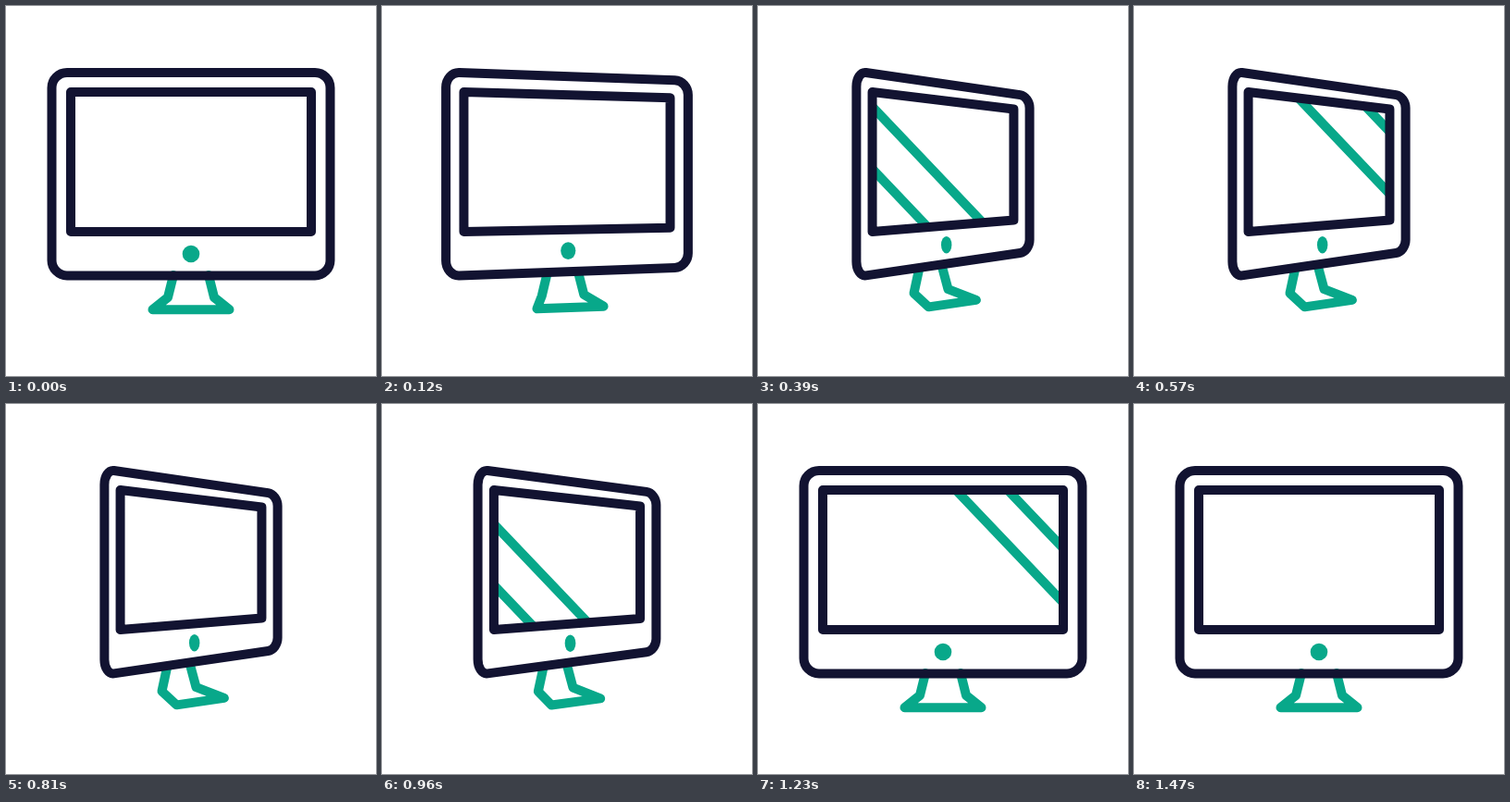
These frames come from a looping animation (400 by 400 pixels, 3620 ms). An HTML page:

```html
<!DOCTYPE html>
<html lang="en">
<head>
<meta charset="utf-8">
<title>Turning monitor</title>
<style>
  html, body { margin: 0; width: 100%; height: 100%; overflow: hidden; background: #fff; }
  svg { display: block; width: 100vw; height: 100vh; }
  path { fill: none; stroke-width: 10; stroke-linecap: round; stroke-linejoin: round; }
  .navy { stroke: #121331; }
  .green { stroke: #08a88a; }
</style>
</head>
<body>
<svg viewBox="0 0 400 400">
  <clipPath id="glass"><path id="hole"/></clipPath>
  <path id="stand" class="green"/>
  <path id="frame" class="navy"/>
  <g id="shine" clip-path="url(#glass)"><path id="rays" class="green"/></g>
  <path id="screen" class="navy"/>
  <ellipse id="dot" cy="268" fill="#08a88a"/>
</svg>
<script>
const LOOP = 3620, STEP = 30, LAST = 49;
const TURN = 9.64;   // steps taken by one turn
const BACK = 40;     // step at which the monitor faces front again
const SWEEP = 20;    // steps between the two shines
const CX = 200, SLOPE = 1.05;

// squeeze: width left when turned; shrink: height lost at the far side
const frame = { half: 150.5, top: 72, bottom: 291.4, round: 16.5, squeeze: 0.622, shrink: 0.221, mid: 181 };
const screen = { half: 130, top: 93, bottom: 244, round: 0, squeeze: 0.588, shrink: 0.205, mid: 183 };

// Half of the stand, top to bottom; drift is the sideways move when turned
const stand = [
  { half: 19, y: 291, squeeze: 0.67, drift: -13.5 },
  { half: 25, y: 315, squeeze: 0.74, drift: -13 },
  { half: 41.5, y: 328.2, squeeze: 0.62, drift: 10.2 }
];

const $ = id => document.getElementById(id);
const set = (id, attrs) => {
  for (const name in attrs) $(id).setAttribute(name, attrs[name]);
};
const mix = (a, b, p) => a + (b - a) * p;

function ease(x) {
  if (x <= 0) return 0;
  if (x >= 1) return 1;
  const a = x ** 1.87, b = (1 - x) ** 1.87;
  return a / (a + b);
}

// Turns away, then back along the same curve in reverse.
const turn = n => ease(Math.min(n, BACK - n) / TURN);

// Rounded rectangle seen in perspective.
function panel(s, p) {
  const span = s.half - s.round;
  const at = (x, y) => {
    const u = (x + span) / (2 * span);
    const scale = 1 - p * s.shrink * u;
    return [CX + x * mix(1, s.squeeze, p), s.mid + (y - s.mid) * scale].join(' ');
  };
  let d = '';
  for (const [sx, sy] of [[-1, -1], [1, -1], [1, 1], [-1, 1]]) {
    const x = sx * s.half, y = sy < 0 ? s.top : s.bottom;
    const side = r => at(x, y - sy * r);
    const flat = r => at(x - sx * r, y);
    const [from, to] = sx === sy ? [side, flat] : [flat, side];
    const r = s.round, c = r * 0.448;
    d += `${d ? 'L' : 'M'}${from(r)}C${from(c)} ${to(c)} ${to(r)}`;
  }
  return d + 'Z';
}

function standPath(p) {
  const at = (k, side) => {
    const x = CX + side * k.half * mix(1, k.squeeze, p) + k.drift * p;
    const y = k.y - p * (6.6 + side * k.half * 0.09);
    return x + ' ' + y;
  };
  const left = stand.map(k => at(k, -1));
  const right = stand.map(k => at(k, 1)).reverse();
  return 'M' + [...left, ...right].join('L');
}

// Steady pace, braking near the end; both shines share it.
function sweep(n) {
  const v = (n < 27 ? n + SWEEP : n) - 41;
  return 125.4 + 21.2 * v - 0.72 * Math.max(v, 0) ** 2;
}

const ray = c => `M${c + 40 / SLOPE} 40L${c + 310 / SLOPE} 310`;

function draw(t) {
  const n = Math.min(Math.floor(t / STEP), LAST);
  const p = turn(n);
  const glass = panel(screen, p);
  set('stand', { d: standPath(p) });
  set('frame', { d: panel(frame, p) });
  set('screen', { d: glass });
  set('hole', { d: glass });
  set('dot', { cx: CX + 3.7 * p, cy: 268 - 9.8 * p, rx: mix(9.3, 5.7, p), ry: 9.3 });
  const c = sweep(n), gap = 56 + 8 * p ** 3;
  set('rays', { d: ray(c) + ray(c + gap) });
  $('shine').style.display = n < LAST ? '' : 'none';
}

const start = performance.now();
function tick() {
  draw((performance.now() - start) % LOOP);
  requestAnimationFrame(tick);
}
tick();
</script>
</body>
</html>
```
